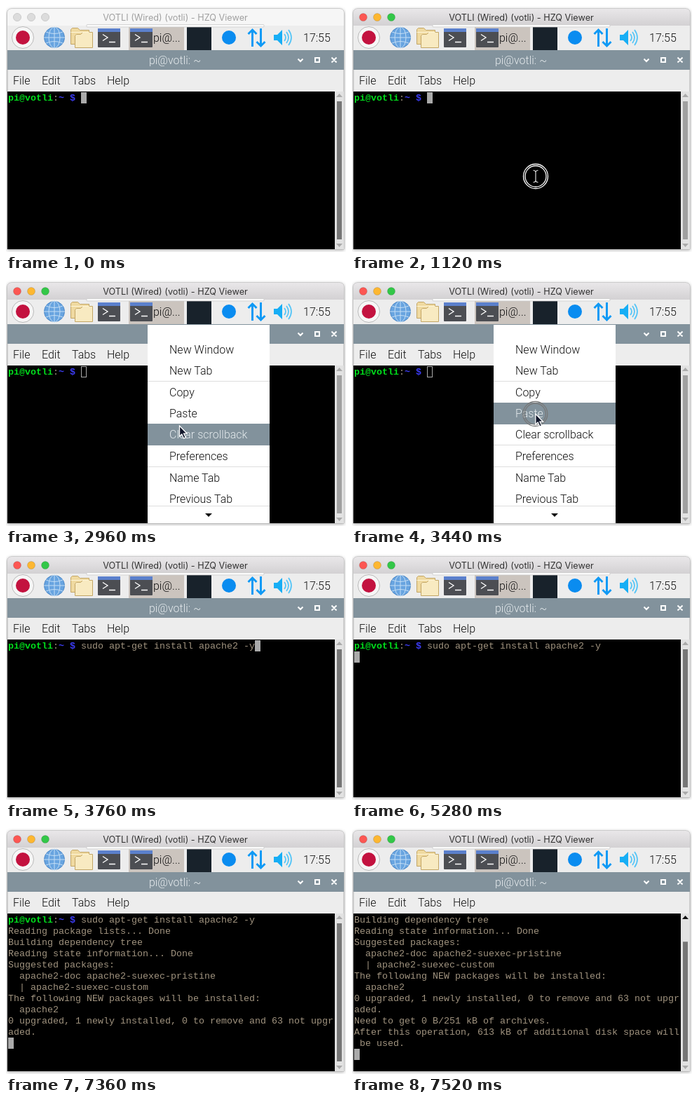
Write an HTML page that moves like this. It is 485 px wide and 351 px high and loops after 8 s.

```html
<!DOCTYPE html>
<html lang="en">
<meta charset="utf-8">
<title>Installing a package</title>
<style>
html, body { margin: 0; width: 485px; height: 351px; overflow: hidden; background: #fff }
svg, pre { position: absolute; left: 0; top: 0; margin: 0 }
svg { font: 300 16px Roboto, sans-serif; fill: #111 }
pre { left: 3px; top: 124px; width: 466px; height: 223px; color: #a0937f;
  font: 13.333px/16px "Liberation Mono", monospace }
pre b { color: #00e01c }
pre b + b { color: #3c3cf5 }
pre i { display: inline-block; box-sizing: border-box; position: relative; top: -1px; width: 8px; height: 16px;
  vertical-align: top; background: #aaa; color: #000; font-style: normal; line-height: 18px }
pre.hollow i { background: none; border: 1px solid #aaa }
#caption { font: 400 12.7px Inter, sans-serif; fill: #a0a0a0 }
#lights circle { fill: #dcdcdc; stroke: #cbcbcb }
#bar { fill: #f6f6f6 }
.active #bar { fill: url(#shade) }
.active #caption { fill: #333 }
.active #lights circle { fill: var(--c); stroke: #0002 }
.line { fill: none; stroke: #fff; stroke-width: 2 }
</style>

<svg id="desk" width="485" height="351">
  <defs>
    <linearGradient id="shade" x2="0" y2="1"><stop stop-color="#e9e7e9"/><stop offset="1" stop-color="#d3d1d3"/></linearGradient>
    <g id="term">
      <rect width="32" height="27" rx="1" fill="#4c4e53"/>
      <rect width="32" height="5" fill="#5b80cc"/>
      <path class="line" style="stroke-width:1.3" d="M7 8.500l7 4.500-7 4.500M16 19.500h9"/>
    </g>
  </defs>
  <path d="M2 347V10q0-6 6-6H476q6 0 6 6V347z" fill="#ededed" stroke="#b4b4b4" style="filter:drop-shadow(0 1px 2px #0005)"/>
  <path id="bar" d="M2 28V10q0-6 6-6H476q6 0 6 6V28z"/>
  <g id="lights">
    <circle cx="16" cy="16" r="5.500" style="--c:#fc5753"/>
    <circle cx="36" cy="16" r="5.500" style="--c:#fdb731"/>
    <circle cx="56" cy="16" r="5.500" style="--c:#33c748"/>
  </g>
  <text id="caption" x="241.500" y="20.500" text-anchor="middle">VOTLI (Wired) (votli) - HZQ Viewer</text>

  <rect x="2" y="28" width="480" height="35" fill="#ededed"/>
  <circle cx="24" cy="45" r="15.500" fill="#f6f6f6" stroke="#b9b9b9"/>
  <circle cx="24" cy="45" r="10" fill="#c3123f"/>
  <circle cx="69" cy="45" r="14.500" fill="#68a4e0" stroke="#4a86c6"/>
  <g fill="none" stroke="#c4def5">
    <path d="M54 45h30M69 30v30M57 37q12 5 24 0M57 53q12-5 24 0"/>
    <ellipse cx="69" cy="45" rx="8" ry="15"/>
  </g>
  <g stroke="#c3a666">
    <path d="M92.500 54.500v-21l2-2h8l3 3h13v20z" fill="#efd9a0"/>
    <path d="M98.500 59.500v-17l2-2h6l3-3h14v22z" fill="#f8eac1"/>
    <path d="M92.500 37.500h26" fill="none" stroke="#fff6d8"/>
  </g>
  <use href="#term" x="131" y="32"/>
  <rect x="175" y="29" width="79" height="34" fill="#cbc4be"/>
  <use href="#term" x="177" y="32"/>
  <text x="210" y="51">pi@...</text>
  <rect x="258" y="29" width="35" height="34" fill="#18222b"/>
  <circle cx="318" cy="45" r="10" fill="#0a8cf0"/>
  <g fill="none" stroke="#109af5" stroke-width="3">
    <path d="M351.500 58V34M345.500 40l6-6 6 6M363.500 32v24M357.500 51l6 6 6-6"/>
  </g>
  <path d="M382 41h5l7-7v22l-7-7h-5z" fill="#17aef5"/>
  <path d="M397 40q4 5 0 10M400 37q6 8 0 16M403 34q8 11 0 22" fill="none" stroke="#52c4f7" stroke-width="1.700"/>
  <text x="424" y="51">17:55</text>
  <rect x="115" y="26.500" width="253" height="3.500" rx="1" fill="#fafafa" stroke="#c4c4c4" stroke-width=".7"/>

  <rect x="2" y="63" width="480" height="28" fill="#82929c"/>
  <text x="241" y="83" text-anchor="middle" fill="#e6ebee">pi@votli: ~</text>
  <path class="line" d="M416.500 75.500l3.500 3.500 3.500-3.500M441 74h6v6h-6zM464.500 73.500l7 7M471.500 73.500l-7 7"/>
  <text y="112"><tspan x="10">File</tspan><tspan x="51">Edit</tspan><tspan x="94">Tabs</tspan><tspan x="144">Help</tspan></text>

  <rect x="2" y="122" width="467" height="225" fill="#000"/>
  <rect x="469" y="122" width="13" height="225" fill="#e2e2e2"/>
  <rect id="thumb" x="472" width="7"/>
  <path id="up" d="M471 130l4.500-5 4.500 5z"/>
  <path d="M471 339l4.500 5 4.500-5z" fill="#aaa"/>
</svg>

<pre id="screen"></pre>

<svg width="485" height="351">
  <g id="menu">
    <rect x="202" y="64" width="174" height="283" fill="#fff"/>
    <path d="M202 144.500h174M202 235.500h174M202 266.500h174M202 322.500h174" stroke="#dedede"/>
    <rect id="hover" x="202" width="174" height="31" fill="#82929c"/>
    <g id="items"></g>
    <path d="M284 333h10l-5 5z"/>
  </g>
  <g id="pointer">
    <g id="ring" fill="none" stroke-width="1.300"><circle r="17.500"/><circle r="15"/></g>
    <path id="beam" d="M-3.500-8.500q3.500 0 3.500 3v11q0 3-3.500 3M3.500-8.500q-3.500 0-3.500 3v11q0 3 3.500 3" fill="none" stroke="#ddd" stroke-width="1.200"/>
    <path id="arrow" d="M.5 0v15l3.300-3 2.700 6 2.700-1.200-2.600-5.600h4.700z" fill="#10162a" stroke="#fff" stroke-width="1.300"/>
  </g>
</svg>

<script>
const $ = id => document.getElementById(id);
const show = (id, on) => $(id).style.display = on ? '' : 'none';
const LOOP = 8000, STEP = 80, ROWS = 13;

const prompt = '<b>pi@votli</b>:<b>~ $</b> ';
const command = prompt + 'sudo apt-get install apache2 -y';
const lists = command + '\nReading package lists... ';
const tree = lists + 'Done\n';
const state = tree + 'Building dependency tree\nReading state information... Done\n';
const plan = state + `Suggested packages:
  apache2-doc apache2-suexec-pristine
  | apache2-suexec-custom
The following NEW packages will be installed:
  apache2
0 upgraded, 1 newly installed, 0 to remove and 63 not upgr
aded.
`;
const sizes = plan + `Need to get 0 B/251 kB of archives.
After this operation, 613 kB of additional disk space will
 be used.
`;
// "█" puts the text cursor on the character that follows it
const screens = [
  [0, prompt + '█'],
  [3680, command + '█'],
  [5280, command + '\n█'],
  [5440, lists.replace('\nR', '\n█R') + '0%'],
  [6160, tree + '█Building dependency tree... 0%'],
  [6240, tree + '█Building dependency tree... 50%'],
  [6640, state + '█'],
  [7360, plan + '█'],
  [7440, sizes + '█']
];

const path = [
  [720, 272, 326], [800, 270, 312], [880, 270, 312], [1040, 262, 243], [1280, 262, 243],
  [1600, 201, 203], [2000, 201, 203], [2080, 200, 204], [2480, 200, 204], [2560, 199, 203],
  [2640, 199, 203], [2960, 247, 208], [3280, 260, 193], [3520, 262, 190]
];

const items = [['New Window', 99], ['New Tab', 129], ['Copy', 160], ['Paste', 190],
  ['Clear scrollback', 220], ['Preferences', 251], ['Name Tab', 282], ['Previous Tab', 312]];
$('items').innerHTML = items.map(([label, y]) => `<text x="233" y="${y + 6}">${label}</text>`).join('');

const within = (t, from, to) => t >= from && t < to;

function pointerAt(t) {
  const next = path.findIndex(p => p[0] > t);
  if (next < 1) return path.at(next).slice(1);
  const [t0, x0, y0] = path[next - 1], [t1, x1, y1] = path[next];
  const k = (t - t0) / (t1 - t0);
  return [x0 + (x1 - x0) * k, y0 + (y1 - y0) * k];
}

function drawTerminal(t) {
  const lines = screens.findLast(s => s[0] <= t)[1].split('\n');
  const html = lines.slice(-ROWS).join('\n').replace(/█(.?)/, (_, c) => `<i>${c || ' '}</i>`);
  if (drawTerminal.last !== html) $('screen').innerHTML = drawTerminal.last = html;
  $('screen').className = within(t, 2560, 3760) ? 'hollow' : '';
  const height = 197 * Math.min(1, ROWS / lines.length);
  $('thumb').setAttribute('y', 333 - height);
  $('thumb').setAttribute('height', height);
  $('thumb').setAttribute('fill', within(t, 1040, 3680) ? '#a0a0a0' : '#767676');
  $('up').setAttribute('fill', lines.length > ROWS ? '#111' : '#aaa');
}

function drawPointer(t) {
  const [x, y] = pointerAt(t);
  const arrow = t >= 2560;
  show('pointer', within(t, 720, 3680));
  $('pointer').setAttribute('transform', `translate(${x} ${y})`);
  show('arrow', arrow);
  show('beam', !arrow);
  show('ring', within(t, 1040, 1200) || t === 2480 || within(t, 3440, 3600));
  $('ring').setAttribute('stroke', arrow ? '#777' : '#fff');
  return y;
}

function drawMenu(t, y) {
  show('menu', within(t, 2720, 3600));
  const active = items.findIndex(item => Math.abs(item[1] - y) <= 15);
  show('hover', active >= 0);
  if (active >= 0) $('hover').setAttribute('y', items[active][1] - 15);
  [...$('items').children].forEach((el, i) => el.setAttribute('fill', i === active ? '#e4eaed' : '#111'));
}

function frame(now) {
  const t = Math.floor(now % LOOP / STEP) * STEP;
  $('desk').classList.toggle('active', t >= 1040);
  drawTerminal(t);
  drawMenu(t, drawPointer(t));
  requestAnimationFrame(frame);
}
frame(performance.now());
</script>
</html>
```
